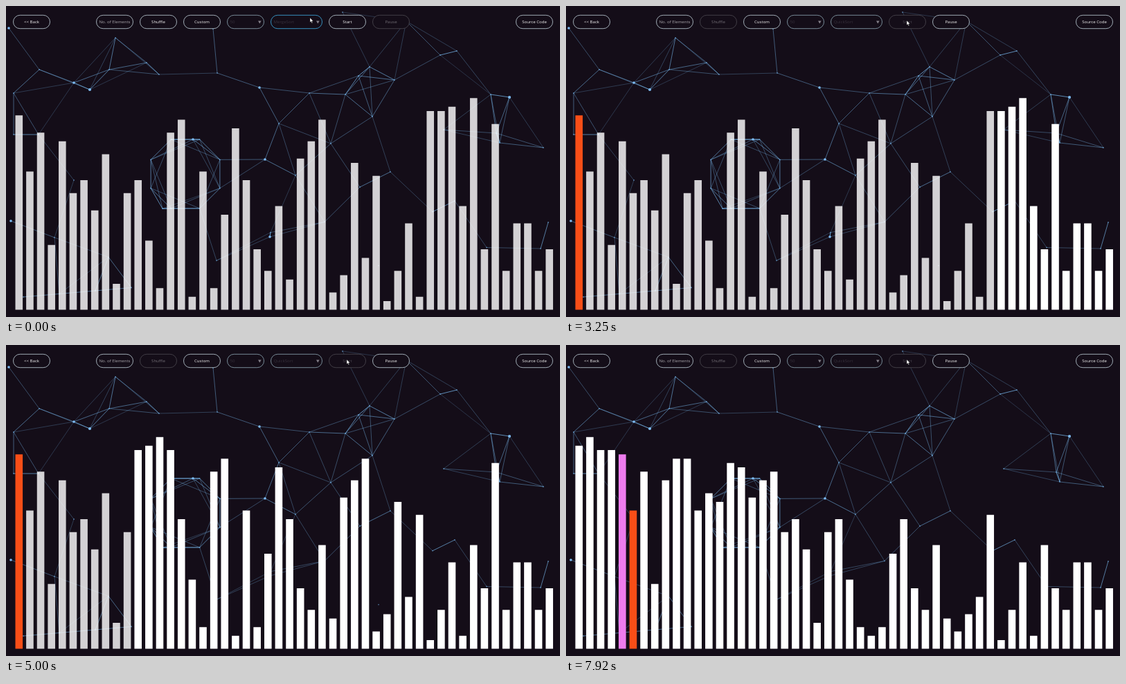
An HTML page with a canvas for the animation above (8000 ms loop, 800x450 px).

```html
<!DOCTYPE html>
<html lang="en">
<head>
<meta charset="utf-8">
<title>Sorting visualizer</title>
<style>
html, body { margin: 0; width: 100%; height: 100%; overflow: hidden; background: #140d18; }
canvas { display: block; }
</style>
</head>
<body>
<canvas id="stage" width="800" height="450"></canvas>
<script>
const ctx = document.getElementById('stage').getContext('2d');
const LOOP = 8000, CLICK = 2500, BG = '#140d18';

// Network: the main nodes (the first BIG ones have a visible dot) ...
const BIG = 9;
const nodes = [
  [121,121], [727,132], [381,334], [7,311], [4,32], [366,118], [374,222], [98,111], [270,193],
  [48,92], [11,126], [149,92], [158,46], [203,82], [221,99], [11,186], [47,186], [98,252],
  [305,97], [299,33], [438,126], [486,9], [578,22], [525,88], [509,101], [490,128], [561,107],
  [529,160], [394,170], [469,199], [418,245], [555,240], [511,262], [648,282], [627,71], [651,65],
  [700,128], [708,184], [713,198], [776,205], [632,179], [783,313]
];
// ... a ring, a row along the bottom left and a wave behind the bars.
for (let i = 0; i < 8; i++) {
  const a = (i + 0.5) * Math.PI / 4;
  nodes.push([259 + 54 * Math.cos(a), 243 + 54 * Math.sin(a)]);
}
for (let i = 0; i < 4; i++) nodes.push([25 + 52 * i, 421 - 4.5 * i]);
for (let i = 0; i < 10; i++) nodes.push([70 + 78 * i, 335 + 42 * Math.sin(2.4 * i)]);

// The unsorted data.
const values = [
  45,32,41,15,39,27,30,23,36,6, 27,30,16,5,41,44,3,32,5,22,
  42,30,14,9,24,7,35,39,44,4, 8,34,12,31,2,9,20,3,46,46,
  47,24,49,14,43,9,20,20,9,14
];

const steps = [];
function partition(a, low) {
  let k = a.length - 1;
  const swap = (i, j) => { [a[i], a[j]] = [a[j], a[i]]; };
  for (let j = k; j > low; j--) {
    const move = a[j] < a[low];
    steps.push({ bars: [...a], j, k: move ? k : j, low });
    if (move) swap(j, k--);
  }
  steps.push({ bars: [...a], j: low, k, low });
  swap(low, k);
  return k;
}
const work = [...values];
const firstPivot = partition(work, 0);
const firstLength = steps.length;
partition(work, firstPivot + 1);

// Time -> step number
const pace = [[0,0], [2640,0], [4250,27.66], [5740,50], [5800,50], [5920,56], [8000,93.4]];
// Time -> pointer position
const path = [[0,439,17], [75,439,17], [800,434,84], [1670,434,84], [2080,492,21], [8000,492,21]];

function sample(keys, t, ease = u => u) {
  let i = 1;
  while (i < keys.length - 1 && keys[i][0] < t) i++;
  const a = keys[i - 1], b = keys[i];
  const u = ease((t - a[0]) / (b[0] - a[0]));
  return a.slice(1).map((v, n) => v + (b[n + 1] - v) * u);
}
const smooth = u => u * u * (3 - 2 * u);

function drawNetwork() {
  ctx.lineWidth = 1;
  nodes.forEach(([x, y], i) => {
    for (const [x2, y2] of nodes.slice(i + 1)) {
      const d = Math.hypot(x2 - x, y2 - y);
      if (d > 93) continue;
      ctx.strokeStyle = `rgba(118,182,234,${0.95 * (1 - d / 122)})`;
      ctx.beginPath();
      ctx.moveTo(x, y);
      ctx.lineTo(x2, y2);
      ctx.stroke();
    }
    ctx.fillStyle = i < BIG ? '#7fbdf5' : 'rgba(120,185,240,.6)';
    ctx.beginPath();
    ctx.arc(x, y, i < 2 ? 2.1 : i < BIG ? 1.8 : 0.9, 0, 7);
    ctx.fill();
  });
}

function drawBars(t) {
  const n = sample(pace, t)[0], index = Math.floor(n);
  const { bars, j, k, low } = steps[index];
  // A swap glides, then rests for the end of its step.
  const shift = (k - j) * smooth(Math.min(1, (n - index) / 0.85));
  const second = index >= firstLength;
  const pivotOn = t >= (second ? 5790 : 2560);
  bars.forEach((v, i) => {
    const slot = i === j ? i + shift : i === k ? i - shift : i;
    const done = second || (n > 0 && i >= j);
    ctx.fillStyle = done ? '#fff' : 'rgba(255,255,255,.81)';
    if (i === low && pivotOn) ctx.fillStyle = '#f94e17';
    if (second && i === firstPivot) ctx.fillStyle = '#ee7cee';
    ctx.fillRect(13.5 + slot * 15.63, 439.5 - v * 6.25, 10.6, v * 6.25);
  });
}

const BRIGHT = ['#f4f4f4', '#aebcc4'], OFF = ['#716d74', '#47434b'],
  HOVER = ['#489fc2', '#3c9fd0'], SELECT = ['#37313c', '#8298a4'];

function button(label, x, w, [ink, border], isSelect) {
  ctx.fillStyle = BG;
  ctx.strokeStyle = border;
  ctx.lineWidth = 0.9;
  ctx.beginPath();
  ctx.roundRect(x + 0.5, 13.3, w - 1, 19.4, 9.7);
  ctx.fill();
  ctx.stroke();
  ctx.fillStyle = ink;
  ctx.textAlign = isSelect ? 'left' : 'center';
  ctx.fillText(label, isSelect ? x + 4.5 : x + w / 2, 25.2);
  if (!isSelect) return;
  ctx.fillStyle = '#85818a';
  ctx.beginPath();
  ctx.moveTo(x + w - 9, 21.6);
  ctx.lineTo(x + w - 4.4, 21.6);
  ctx.lineTo(x + w - 6.7, 25.4);
  ctx.fill();
}

function drawToolbar(t, [px, py]) {
  const over = (x, w) => px > x && px < x + w && py > 13 && py < 33;
  const running = t >= CLICK;
  ctx.font = '6.1px "Open Sans", "Noto Sans", sans-serif';
  button('<< Back', 10, 54, BRIGHT);
  button('No. of Elements', 130, 54, ['#a9a6ab', BRIGHT[1]]);
  button('Shuffle', 193, 54, running ? OFF : BRIGHT);
  button('Custom', 256, 54, BRIGHT);
  button('50', 319, 54, SELECT, true);
  button(t < 1330 ? 'MergeSort' : 'QuickSort', 382, 75,
    over(382, 75) ? [SELECT[0], HOVER[1]] : SELECT, true);
  button('Start', 466, 54, running ? ['#4b4750', OFF[1]] : over(466, 54) ? HOVER : BRIGHT);
  button('Pause', 529, 54, running ? BRIGHT : OFF);
  button('Source Code', 736, 54, BRIGHT);
}

const arrow = new Path2D('M0 0V6.6L1.5 5.3L2.6 7.7L3.6 7.2L2.6 4.9L4.6 4.8Z');
function drawPointer([x, y]) {
  ctx.save();
  ctx.translate(x, y);
  ctx.fillStyle = '#fff';
  ctx.strokeStyle = '#111';
  ctx.lineWidth = 0.4;
  ctx.fill(arrow);
  ctx.stroke(arrow);
  ctx.restore();
}

const start = performance.now();
function frame() {
  const t = (performance.now() - start) % LOOP;
  const pointer = sample(path, t, smooth);
  ctx.fillStyle = BG;
  ctx.fillRect(0, 0, 800, 450);
  drawNetwork();
  drawBars(t);
  drawToolbar(t, pointer);
  drawPointer(pointer);
  requestAnimationFrame(frame);
}
frame();
</script>
</body>
</html>
```
